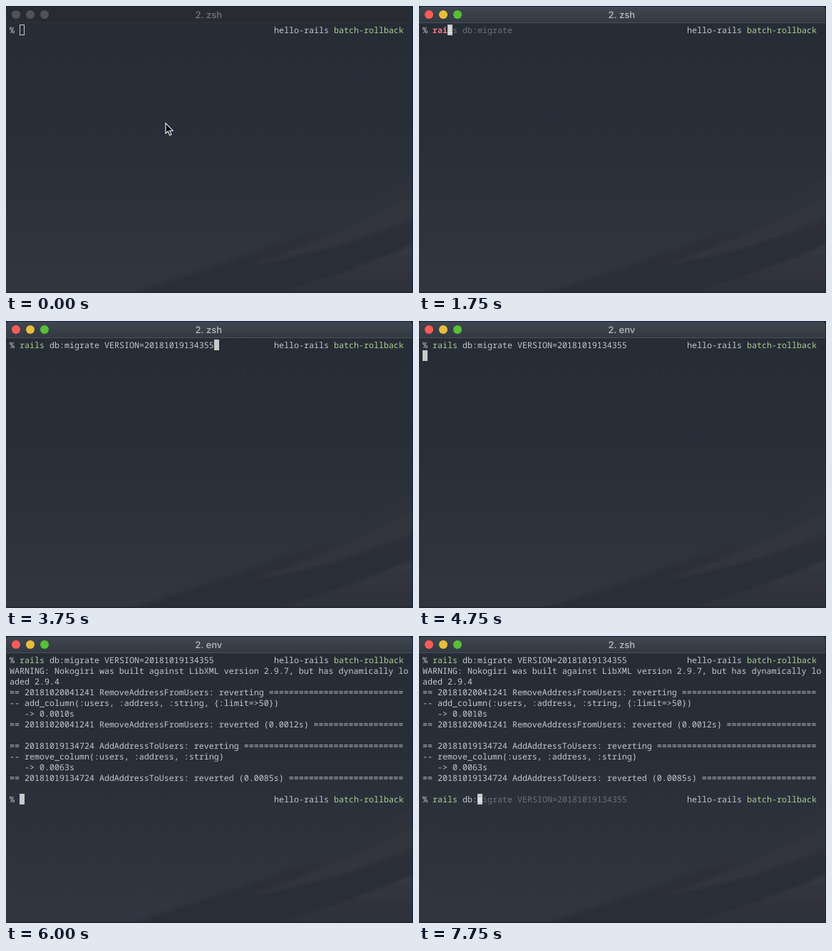
Write an HTML page that moves like this. It is 571x402 px and loops after 8 s.

```html
<!DOCTYPE html>
<html lang="en">
<head>
<meta charset="utf-8">
<title>Terminal</title>
<style>
html, body { margin: 0; width: 100%; height: 100%; overflow: hidden; background: #10192b; }
svg { display: block; width: 571px; height: 402px; }
text { white-space: pre; text-rendering: geometricPrecision; }
#screen text { font: 11.667px "Noto Sans Mono", monospace; fill: #c3c8cc; }
#title { font: 500 13px Inter, sans-serif; text-anchor: middle; }
#screen .ok { fill: #abd093; }
#screen .bad { fill: #ee7880; font-weight: 700; }
#screen .hint { fill: #6c727a; }
#screen .path { text-decoration: underline; }
#screen .under { fill: #f4f4f4; }
#screen .sign { fill: #c5c6b8; }
</style>
</head>
<body>
<svg viewBox="0 0 571 402">
  <defs>
    <linearGradient id="sky" x1="0" y1="0" x2="0" y2="1">
      <stop offset="0" stop-color="#262c35"/>
      <stop offset=".45" stop-color="#292f39"/>
      <stop offset="1" stop-color="#313741"/>
    </linearGradient>
    <linearGradient id="bar" x1="0" y1="0" x2="0" y2="1">
      <stop offset="0" stop-color="#414750"/>
      <stop offset="1" stop-color="#333941"/>
    </linearGradient>
    <linearGradient id="dune" x1="0" y1="0" x2=".35" y2="1">
      <stop offset="0" stop-color="#30343e"/>
      <stop offset="1" stop-color="#2b2d37"/>
    </linearGradient>
    <linearGradient id="ridge" x1="0" y1="0" x2="0" y2="1">
      <stop offset="0" stop-color="#363943"/>
      <stop offset="1" stop-color="#2c2e38"/>
    </linearGradient>
    <filter id="soft"><feGaussianBlur stdDeviation="2.5"/></filter>
    <clipPath id="win"><path d="M0 402V6Q0 1 5 1H565Q570 1 570 6V402Z"/></clipPath>
  </defs>
  <rect width="571" height="402" fill="#10233f"/>
  <g clip-path="url(#win)">
    <rect width="571" height="402" fill="url(#sky)"/>
    <g filter="url(#soft)">
      <path d="M175 402Q290 366 370 336T490 285T580 234V410H175Z" fill="url(#dune)"/>
      <path d="M330 365Q440 335 580 262V290Q470 345 330 365Z" fill="#343740" opacity=".6"/>
      <path d="M375 402Q480 375 580 330V410H375Z" fill="url(#ridge)"/>
    </g>
    <circle cx="333" cy="70" r=".8" fill="#4a505a"/>
    <circle cx="548" cy="247" r=".7" fill="#4a4d57"/>
    <rect id="head" y="1" width="571" height="22"/>
    <rect id="rule" y="23" width="571" height="1"/>
    <rect y="400" width="571" height="2" fill="#252a33"/>
  </g>
  <circle class="lamp" cx="14" cy="12" r="6"/>
  <circle class="lamp" cx="34" cy="12" r="6"/>
  <circle class="lamp" cx="54" cy="12" r="6"/>
  <text id="title" x="284.3" y="17"></text>
  <rect id="caret"/>
  <g id="screen"></g>
  <path id="mouse" d="M224 164V178.5L227.3 175.5L229.6 181L232 180L229.7 174.7H234.2Z" fill="#0b0c0e" stroke="#f4f4f4" stroke-width="1.1"/>
</svg>
<script>
const LOOP = 8000, CELL = 7, LINE = 15, LEFT = 5, TOP = 26;
const SHORT = 'rails db:migrate';
const FULL = SHORT + ' VERSION=20181019134355';
const LAMPS = ['#fc5b57', '#e5bf3c', '#57c038'];

const rule = s => (s + ' ').padEnd(79, '=');
const OUTPUT = [
  'WARNING: Nokogiri was built against LibXML version 2.9.7, but has dynamically lo',
  'aded 2.9.4',
  rule('== 20181020041241 RemoveAddressFromUsers: reverting'),
  '-- add_column(:users, :address, :string, {:limit=>50})',
  '   -> 0.0010s',
  rule('== 20181020041241 RemoveAddressFromUsers: reverted (0.0012s)'),
  '',
  rule('== 20181019134724 AddAddressToUsers: reverting'),
  '-- remove_column(:users, :address, :string)',
  '   -> 0.0063s',
  rule('== 20181019134724 AddAddressToUsers: reverted (0.0085s)'),
  ''
];

// Each step overrides part of the state from its time onwards.
const STEPS = [
  [0, { focus: false, mouse: true, title: 'zsh', typed: 0, lines: 0, hint: SHORT, phase: 'first' }],
  [500, { focus: true }],
  [750, { mouse: false }],
  [1750, { typed: 3 }],
  [2000, { typed: 6 }],
  [2250, { typed: 8 }],
  [2500, { typed: 9 }],
  [2750, { typed: 12 }],
  [3000, { typed: 14 }],
  [3250, { typed: 16 }],
  [3500, { typed: 17, hint: FULL }],
  [3750, { typed: FULL.length }],
  [4250, { phase: 'run' }],
  [4750, { title: 'env' }],
  [5500, { lines: 2 }],
  [6000, { lines: OUTPUT.length, phase: 'second', typed: 0 }],
  [6250, { title: 'ruby' }],
  [7000, { title: 'zsh', typed: 3 }],
  [7250, { typed: 6 }],
  [7750, { typed: 9 }]
];

const $ = id => document.getElementById(id);
const esc = s => s.replace(/&/g, '&amp;').replace(/</g, '&lt;').replace(/>/g, '&gt;');
const put = (col, row, s, cls = '') => s
  ? `<text class="${cls}" x="${LEFT + col * CELL}" y="${TOP + 12 + row * LINE}">${esc(s)}</text>` : '';

function prompt(row, n, hint, live) {
  let out = put(0, row, '%', 'sign') + put(53, row, 'hello-rails') + put(65, row, 'batch-rollback', 'ok');
  if (!n) return out;
  const text = hint.slice(0, n);
  out += put(2, row, text.slice(0, 5), n < 5 ? 'bad' : 'ok');
  out += put(8, row, text.slice(6), n === 8 ? 'path' : '');
  if (live) out += put(2 + n, row, hint.slice(n, n + 1).trim(), 'under') + put(3 + n, row, hint.slice(n + 1), 'hint');
  return out;
}

function set(id, attrs) {
  for (const k in attrs) $(id).setAttribute(k, attrs[k]);
}

let last = -1;
function draw(t) {
  const step = STEPS.filter(s => s[0] <= t).length;
  if (step === last) return;
  last = step;
  const s = Object.assign({}, ...STEPS.slice(0, step).map(x => x[1]));
  const first = s.phase === 'first', second = s.phase === 'second';

  let html = prompt(0, first ? s.typed : FULL.length, first ? s.hint : FULL, first);
  OUTPUT.slice(0, s.lines).forEach((l, i) => html += put(0, i + 1, l));
  if (second) html += prompt(13, s.typed, FULL, true);
  $('screen').innerHTML = html;

  const row = first ? 0 : s.lines + 1;
  const col = s.phase === 'run' ? 0 : 2 + s.typed;
  const x = LEFT + col * CELL, y = TOP + row * LINE;
  set('caret', s.focus
    ? { x, y, width: 7, height: 15, fill: '#c8c9ca', stroke: 'none' }
    : { x: x + .5, y: y + .5, width: 6, height: 14, fill: 'none', stroke: '#c8c9ca' });

  document.querySelectorAll('.lamp').forEach((c, i) => c.setAttribute('fill', s.focus ? LAMPS[i] : '#50545a'));
  set('head', { fill: s.focus ? 'url(#bar)' : '#282c32' });
  set('rule', { fill: s.focus ? '#4b5159' : '#30353c' });
  set('title', { fill: s.focus ? '#b9bdc2' : '#74787e' });
  $('title').textContent = '2. ' + s.title;
  set('mouse', { visibility: s.mouse ? 'visible' : 'hidden' });
}

function tick() {
  draw(performance.now() % LOOP);
  requestAnimationFrame(tick);
}
tick();
</script>
</body>
</html>
```
